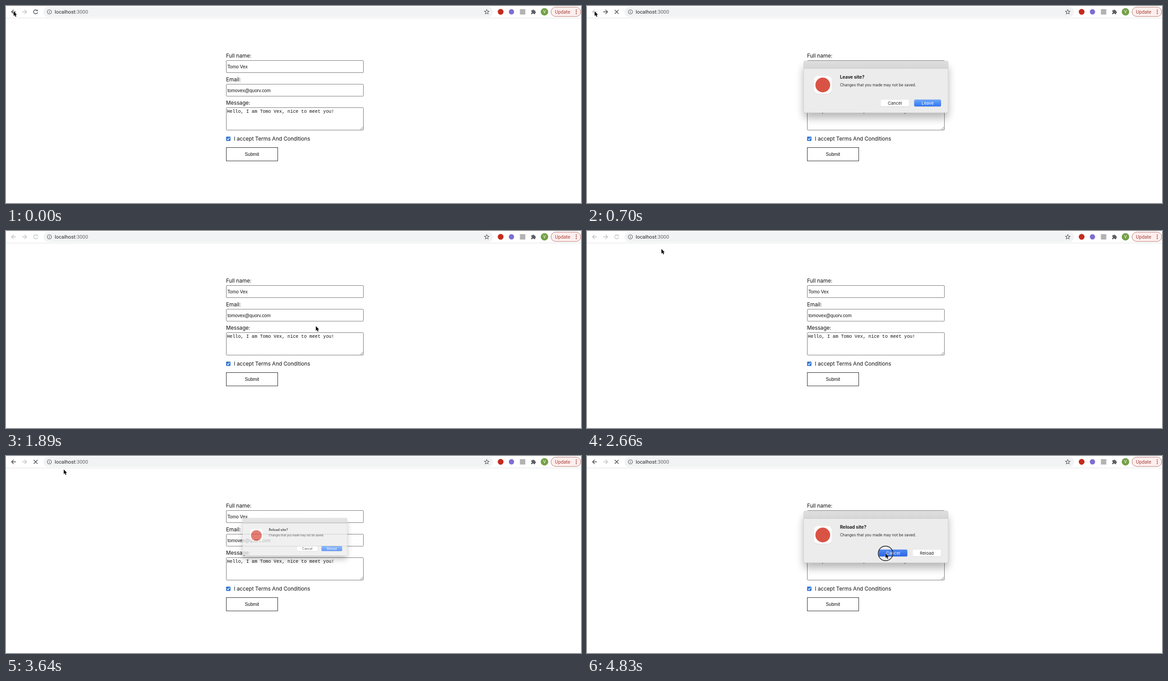
Animation of 1275 by 439 pixels, one loop 4900 ms. Source, as an HTML page:

```html
<!DOCTYPE html>
<html lang="en">
<head>
<meta charset="utf-8">
<title>Leave confirmation</title>
<style>
  html, body { margin: 0; width: 100%; height: 100%; overflow: hidden; background: #fff; }
  svg { display: block; width: 100%; height: 100%; }
  text { white-space: pre; }
  .label { font: 11.65px Inter, sans-serif; fill: #111; }
  .field { font: 10.2px "Liberation Sans", Arial, sans-serif; fill: #111; }
  .mono { font: 10.17px "Liberation Mono", "Courier New", monospace; fill: #111; }
  .bar { font: 11.25px Roboto, sans-serif; }
  .title { font: bold 9.9px Inter, sans-serif; fill: #1d1d1d; }
  .note { font: 8.4px Inter, sans-serif; fill: #2a2a2a; }
  .button { font: 9.5px Inter, sans-serif; text-anchor: middle; }
  .box { fill: #fff; stroke: #767676; }
  .icon { fill: none; stroke-width: 1.4; }
</style>
</head>
<body>
<svg viewBox="0 0 1275 439">
  <defs>
    <linearGradient id="blue" x2="0" y2="1">
      <stop stop-color="#6fa9f8"/><stop offset="1" stop-color="#2f75f5"/>
    </linearGradient>
    <linearGradient id="pressed" x2="0" y2="1">
      <stop stop-color="#5089f1"/><stop offset="1" stop-color="#2a66e6"/>
    </linearGradient>
    <linearGradient id="titlebar" x2="0" y2="1">
      <stop stop-color="#dfdfdf"/><stop offset="1" stop-color="#d6d6d6"/>
    </linearGradient>
    <filter id="soft" x="-20%" y="-40%" width="140%" height="180%">
      <feGaussianBlur stdDeviation="9"/>
    </filter>
  </defs>

  <!-- toolbar -->
  <path d="M0 26.8H1275" stroke="#dfe0e1"/>
  <rect x="83" y="2" width="997" height="22.5" rx="11.2" fill="#f1f3f4"/>
  <path id="back" class="icon" d="M22 13H12.5M17 8.3L12.3 13L17 17.7"/>
  <path id="forward" class="icon" d="M36 13H45.5M41 8.3L45.7 13L41 17.7"/>
  <g id="reload" class="icon">
    <path d="M69.2 10A4.5 4.5 0 1 0 70.1 14.2"/>
    <path d="M70.4 8V11.6H66.8Z" fill="currentColor" stroke="none"/>
  </g>
  <path id="stop" class="icon" d="M61.5 8.8L70 17.2M70 8.8L61.5 17.2" stroke="#45484c"/>
  <g stroke="#5f6368" fill="none">
    <circle cx="96.2" cy="13" r="4.7" stroke-width="1.1"/>
    <path d="M96.2 12.3V15.6M96.2 10.1V11.3" stroke-width="1.2"/>
    <path id="star" stroke-width="1.1"/>
  </g>
  <text class="bar" x="108" y="17" fill="#26282b">localhost<tspan fill="#666a6e">:3000</tspan></text>
  <circle cx="1096.8" cy="13" r="6.4" fill="#c42b1e"/>
  <circle cx="1120.8" cy="13" r="5.9" fill="#7d6fd2"/>
  <rect x="1139.5" y="7" width="12" height="12" fill="#b3b3b3"/>
  <path d="M1164.5 9.7H1167.2A1.7 1.7 0 1 1 1170.6 9.7H1173.3V12.2A1.7 1.7 0 1 1 1173.3 15.6V18.3H1170.5A1.7 1.7 0 0 0 1167.1 18.3H1164.5V15.6A1.7 1.7 0 0 0 1164.5 12.2Z" fill="#5a5e62"/>
  <circle cx="1194" cy="13" r="8.3" fill="#74a048"/>
  <text class="bar" x="1194" y="16.4" text-anchor="middle" fill="#fff" style="font-size:9.5px">V</text>
  <rect x="1208.5" y="2.7" width="66" height="20.6" rx="10.3" fill="#fdefee" stroke="#b8756f"/>
  <text class="bar" x="1217.3" y="17" fill="#a5423b" style="font-size:10.7px">Update</text>
  <g fill="#a5423b">
    <circle cx="1264.5" cy="9" r="1.2"/><circle cx="1264.5" cy="13" r="1.2"/><circle cx="1264.5" cy="17" r="1.2"/>
  </g>

  <!-- form -->
  <text class="label" x="488" y="115">Full name:</text>
  <rect class="box" x="488.5" y="121.5" width="304" height="27" rx="1.5"/>
  <text class="field" x="491" y="139">Tomo Vex</text>
  <text class="label" x="488" y="167.5">Email:</text>
  <rect class="box" x="488.5" y="174.3" width="304" height="26.7" rx="1.5"/>
  <text class="field" x="491" y="191.5">tomovex@quorv.com</text>
  <text class="label" x="488" y="220">Message:</text>
  <rect class="box" x="488.5" y="226.5" width="304" height="50" rx="1"/>
  <text class="mono" x="490" y="238.3">Hello, I am Tomo Vex, nice to meet you!</text>
  <path d="M785.5 275.5L791.5 269.5M789 275.5L791.5 273" stroke="#666" stroke-width=".9"/>
  <rect x="488" y="291" width="9.8" height="9.8" rx="1.6" fill="#3377d6"/>
  <path d="M490.2 296L492.2 298.1L495.8 293.4" fill="none" stroke="#fff" stroke-width="1.5"/>
  <text class="label" x="505.3" y="300.2">I accept Terms And Conditions</text>
  <rect x="488.5" y="315.5" width="114" height="29.7" fill="#fff" stroke="#222"/>
  <text class="field" x="545.3" y="334" text-anchor="middle">Submit</text>

  <!-- dialog -->
  <g id="dialog">
    <rect x="480" y="134" width="321" height="116" rx="8" fill="#000" opacity=".28" filter="url(#soft)"/>
    <rect x="480.3" y="122.3" width="320.5" height="115.6" rx="3.5" fill="#ececec" stroke="#c9c9c9" stroke-width=".7"/>
    <path d="M480.5 139V126Q480.5 122.5 484 122.5H797Q800.5 122.5 800.5 126V139Z" fill="url(#titlebar)"/>
    <path d="M480.5 139.2H800.5" stroke="#c4c4c4" stroke-width=".8"/>
    <rect x="503" y="156.5" width="40" height="40" rx="9" fill="#000" opacity=".09"/>
    <rect x="503.3" y="156" width="39.4" height="39.4" rx="9" fill="#fff"/>
    <circle cx="522.8" cy="176" r="16.4" fill="#d95345"/>
    <text class="title" id="heading" x="561" y="162.3"></text>
    <text class="note" x="561" y="179.2">Changes that you made may not be saved.</text>
    <g id="cancel"></g>
    <g id="confirm"></g>
  </g>

  <circle id="ring" r="16.3" fill="none" stroke="#15171c" stroke-width="1.4"/>
  <path id="pointer" d="M0 0V10.2L2.3 8.1L4 12L5.9 11.2L4.2 7.4H7.3Z" fill="#000" stroke="#fff" stroke-width=".9" paint-order="stroke"/>
</svg>
<script>
const LOOP = 4900, STEP = 70, OPEN_TIME = 200, CLOSE_TIME = 140;
const DARK = '#45484c', PALE = '#c0c2c4';
const $ = id => document.getElementById(id);
const clamp = v => Math.max(0, Math.min(1, v));
const show = (id, on) => $(id).setAttribute('visibility', on ? 'visible' : 'hidden');

// time, x, y of the pointer tip
const PATH = [
  [0, 17, 12], [980, 17, 12], [1050, 75, 32], [1120, 178, 72], [1190, 250, 105],
  [1260, 490, 168], [1330, 667, 191], [1400, 680, 205], [1470, 687, 212],
  [2170, 687, 212], [2310, 600, 175], [2450, 460, 112], [2520, 378, 84],
  [2590, 260, 60], [2660, 165, 40], [2730, 95, 22], [2800, 66, 12],
  [3500, 66, 12], [3570, 85, 18], [3640, 128, 30], [3850, 185, 50],
  [4060, 290, 95], [4270, 530, 180], [4410, 645, 212], [4480, 662, 217]
];
const CLICKS = [[140, 350], [1540, 1680], [3360, 3500], [4760, 4900]];
const DIALOGS = [
  { word: 'Leave', open: 424, press: 1540, close: 1680, cancel: [651, 63.3], confirm: [725.5, 59.5] },
  { word: 'Reload', open: 3550, press: 4760, close: LOOP, cancel: [647, 63.3], confirm: [722, 63] }
];

function pointerAt(t) {
  const i = PATH.findIndex(p => p[0] > t);
  if (i < 0) return PATH[PATH.length - 1].slice(1);
  const [t0, x0, y0] = PATH[i - 1], [t1, x1, y1] = PATH[i];
  const k = (t - t0) / (t1 - t0);
  return [x0 + (x1 - x0) * k, y0 + (y1 - y0) * k];
}

function drawButton(id, [x, width], label, fill) {
  const ink = fill === '#fff' ? '#222' : '#fff';
  $(id).innerHTML =
    `<rect x="${x - .3}" y="208.6" width="${width + .6}" height="16" rx="3" fill="#000" opacity=".14"/>
     <rect x="${x}" y="208.4" width="${width}" height="15.3" rx="2.8" fill="${fill}"/>
     <text class="button" x="${x + width / 2}" y="219.7" fill="${ink}">${label}</text>`;
}

function drawDialog(t) {
  const d = DIALOGS.find(d => t >= d.open && t < d.close + CLOSE_TIME);
  show('dialog', d);
  if (!d) return;
  const grow = clamp((t - d.open) / OPEN_TIME);
  const fade = 1 - clamp((t - d.close) / CLOSE_TIME);
  const pressed = t >= d.press;
  $('dialog').setAttribute('opacity', Math.min(1, grow + .3) * fade);
  $('dialog').setAttribute('transform',
    `translate(640.5 180.3) scale(${.5 + grow / 2}) translate(-640.5 -180.3)`);
  $('heading').textContent = d.word + ' site?';
  drawButton('cancel', d.cancel, 'Cancel', pressed ? 'url(#pressed)' : '#fff');
  drawButton('confirm', d.confirm, d.word, pressed ? '#fff' : 'url(#blue)');
}

function drawToolbar(t) {
  const leaving = t >= 280 && t < 1750;
  const reloading = t >= 3430;
  const reloadInk = t < 280 ? DARK : PALE;
  $('back').setAttribute('stroke', t < 280 || reloading ? DARK : PALE);
  $('forward').setAttribute('stroke', leaving ? DARK : PALE);
  $('reload').setAttribute('stroke', reloadInk);
  $('reload').setAttribute('color', reloadInk);
  show('reload', !leaving && !reloading);
  show('stop', leaving || reloading);
}

function draw(t) {
  const place = `translate(${pointerAt(t).join(' ')})`;
  $('pointer').setAttribute('transform', place);
  $('ring').setAttribute('transform', place);
  show('ring', CLICKS.some(([from, to]) => t >= from && t < to));
  drawToolbar(t);
  drawDialog(t);
}

const starPoints = Array.from({ length: 10 }, (_, i) => {
  const a = i * Math.PI / 5, r = i % 2 ? 2.4 : 5.4;
  return [1066 + r * Math.sin(a), 13.3 - r * Math.cos(a)];
});
$('star').setAttribute('d', 'M' + starPoints.join('L') + 'Z');

const start = performance.now();
function tick() {
  const t = (performance.now() - start) % LOOP;
  draw(Math.floor(t / STEP) * STEP);
  requestAnimationFrame(tick);
}
tick();
</script>
</body>
</html>
```
